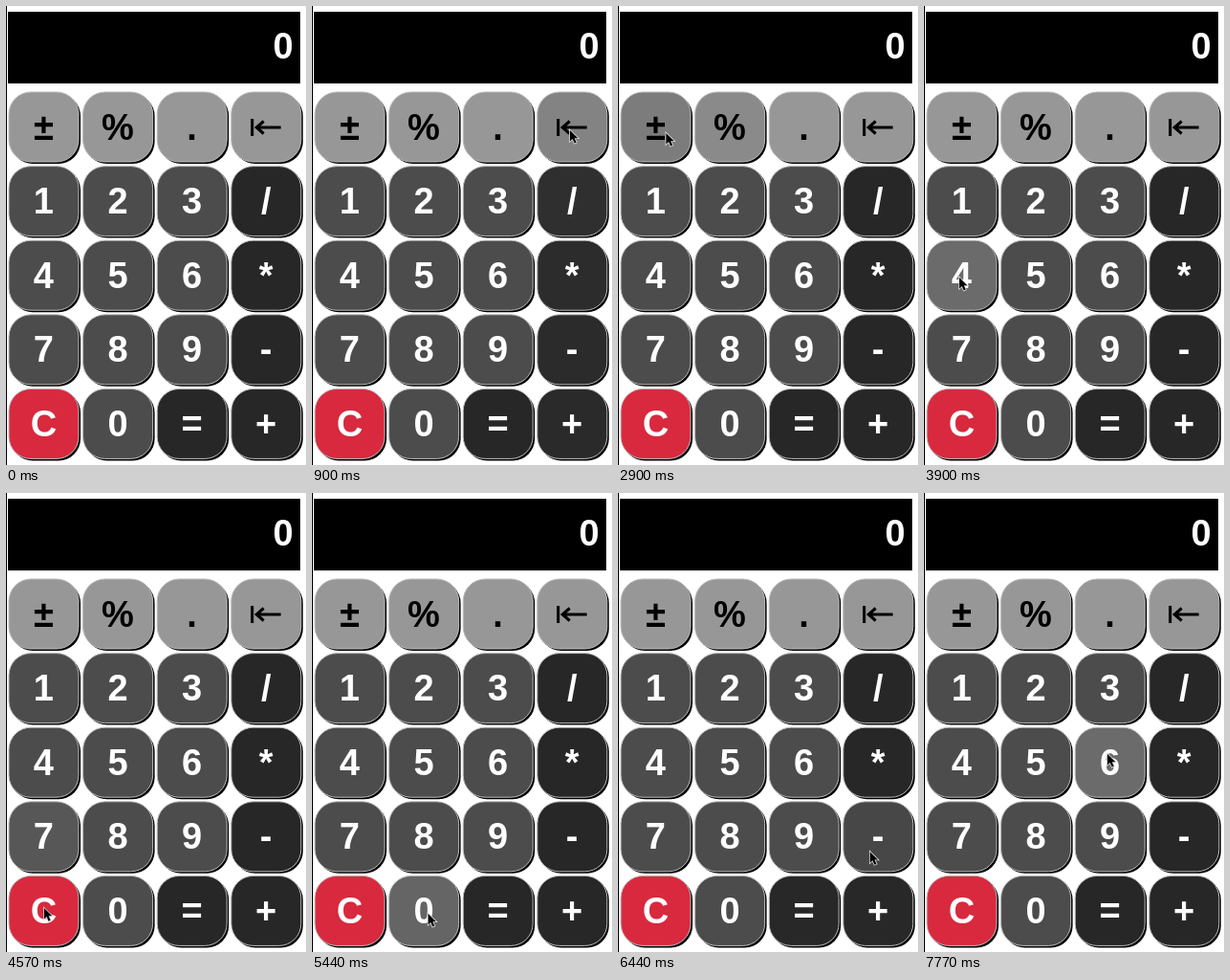
These frames come from a looping animation (314x480 px, 8 s). An HTML page with a canvas:

```html
<!DOCTYPE html>
<html lang="en">
<head>
<meta charset="utf-8">
<title>Calculator</title>
<style>
  html, body { margin: 0; width: 314px; height: 480px; overflow: hidden; background: #fff; }
  canvas { display: block; }
</style>
</head>
<body>
<canvas id="stage" width="314" height="480"></canvas>
<script>
const ctx = document.getElementById('stage').getContext('2d');
const LOOP = 8000, FADE = 400, SAMPLES = 40;
const PITCH = 77.6, LEFT = 3, TOP = 90, SIZE = 73, RADIUS = 23;

// Idle and hover fill of each kind of key, as grey levels or a fixed colour
const KINDS = {
  top: { idle: 151, hover: 109 },
  digit: { idle: 76, hover: 107 },
  op: { idle: 39, hover: 80 },
  clear: { color: '#d9293e' }
};

const keys = [...'±%.⇤123/456*789-C0=+'].map((label, i) => {
  const col = i % 4, row = Math.floor(i / 4);
  const kind = row === 0 ? 'top' : label === 'C' ? 'clear' : /\d/.test(label) ? 'digit' : 'op';
  return { label, kind, x: LEFT + col * PITCH, y: TOP + row * PITCH };
});

// The pointer enters from below, then makes these moves and rests after each
const ENTRY = { x: 290, y: 480 };
const moves = [
  { at: 500, ms: 400, x: 270, y: 130 },
  { at: 1440, ms: 660, x: 202, y: 125 },
  { at: 2300, ms: 800, x: 48, y: 133 },
  { at: 3170, ms: 800, x: 37, y: 284 },
  { at: 4040, ms: 800, x: 40, y: 440 },
  { at: 5040, ms: 400, x: 121, y: 440 },
  { at: 5440, ms: 400, x: 200, y: 438 },
  { at: 5900, ms: 800, x: 266, y: 373 },
  { at: 6770, ms: 800, x: 185, y: 281 },
  { at: 7640, ms: 130, x: 192, y: 273 }
];

const easeOut = k => 1 - (1 - k) ** 3;

function pointerAt(t) {
  const i = moves.findLastIndex(m => m.at <= t);
  if (i < 0) return null;
  const to = moves[i], from = moves[i - 1] || ENTRY;
  const k = easeOut(Math.min(1, (t - to.at) / to.ms));
  return { x: from.x + (to.x - from.x) * k, y: from.y + (to.y - from.y) * k };
}

const inside = (p, key) =>
  p && p.x >= key.x && p.x < key.x + SIZE && p.y >= key.y && p.y < key.y + SIZE;

function fillKeyShape(x, y, color) {
  ctx.beginPath();
  ctx.roundRect(x, y, SIZE, SIZE, RADIUS);
  ctx.fillStyle = color;
  ctx.fill();
}

function drawText(label, x, baseline, color) {
  ctx.fillStyle = color;
  ctx.fillText(label, x, baseline);
}

function drawBackArrow(x, y) {
  ctx.strokeStyle = '#000';
  ctx.lineWidth = 3;
  ctx.stroke(new Path2D(`M${x - 14} ${y - 9}v18M${x - 9} ${y}h25M${x - 2} ${y - 6.5}l-7.5 6.5l7.5 6.5`));
}

function keyColor({ idle, hover, color }, level) {
  if (color) return color;
  const grey = Math.round(idle + (hover - idle) * level);
  return `rgb(${grey}, ${grey}, ${grey})`;
}

function drawKey(key, trail) {
  const { label, kind, x, y } = key;
  const level = trail.filter(p => inside(p, key)).length / SAMPLES;

  fillKeyShape(x + 2, y + 2, '#000');
  fillKeyShape(x, y, keyColor(KINDS[kind], level));
  ctx.lineWidth = 1;
  ctx.strokeStyle = '#bbb';
  ctx.stroke();

  const cx = x + 36.4;
  if (label === '⇤') drawBackArrow(cx - .5, y + 37);
  else drawText(label, cx, y + 49.6, kind === 'top' ? '#000' : '#fff');
}

function drawPointer({ x, y }) {
  const arrow = new Path2D(`M${x} ${y}v11.5l2.7-2.5l2 4.6l2-.9l-2-4.4h3.6z`);
  ctx.lineWidth = 1.6;
  ctx.strokeStyle = '#ddd';
  ctx.stroke(arrow);
  ctx.fillStyle = '#000';
  ctx.fill(arrow);
}

function draw(now) {
  const t = now % LOOP;
  // Recent pointer positions: a key's fade is the share of them it contains
  const trail = Array.from({ length: SAMPLES }, (_, i) => pointerAt(t - i * FADE / SAMPLES));

  ctx.fillStyle = '#fff';
  ctx.fillRect(0, 0, 314, 480);
  ctx.fillStyle = '#000';
  ctx.fillRect(0, 0, 1, 480);
  ctx.fillRect(2, 6, 306, 75);

  ctx.font = 'bold 38px "Liberation Sans", Arial, sans-serif';
  ctx.textAlign = 'center';
  drawText('0', 290, 55.3, '#fff');
  keys.forEach(key => drawKey(key, trail));
  if (trail[0]) drawPointer(trail[0]);
}

const start = performance.now();
function tick() {
  draw(performance.now() - start);
  requestAnimationFrame(tick);
}
tick();
</script>
</body>
</html>
```
